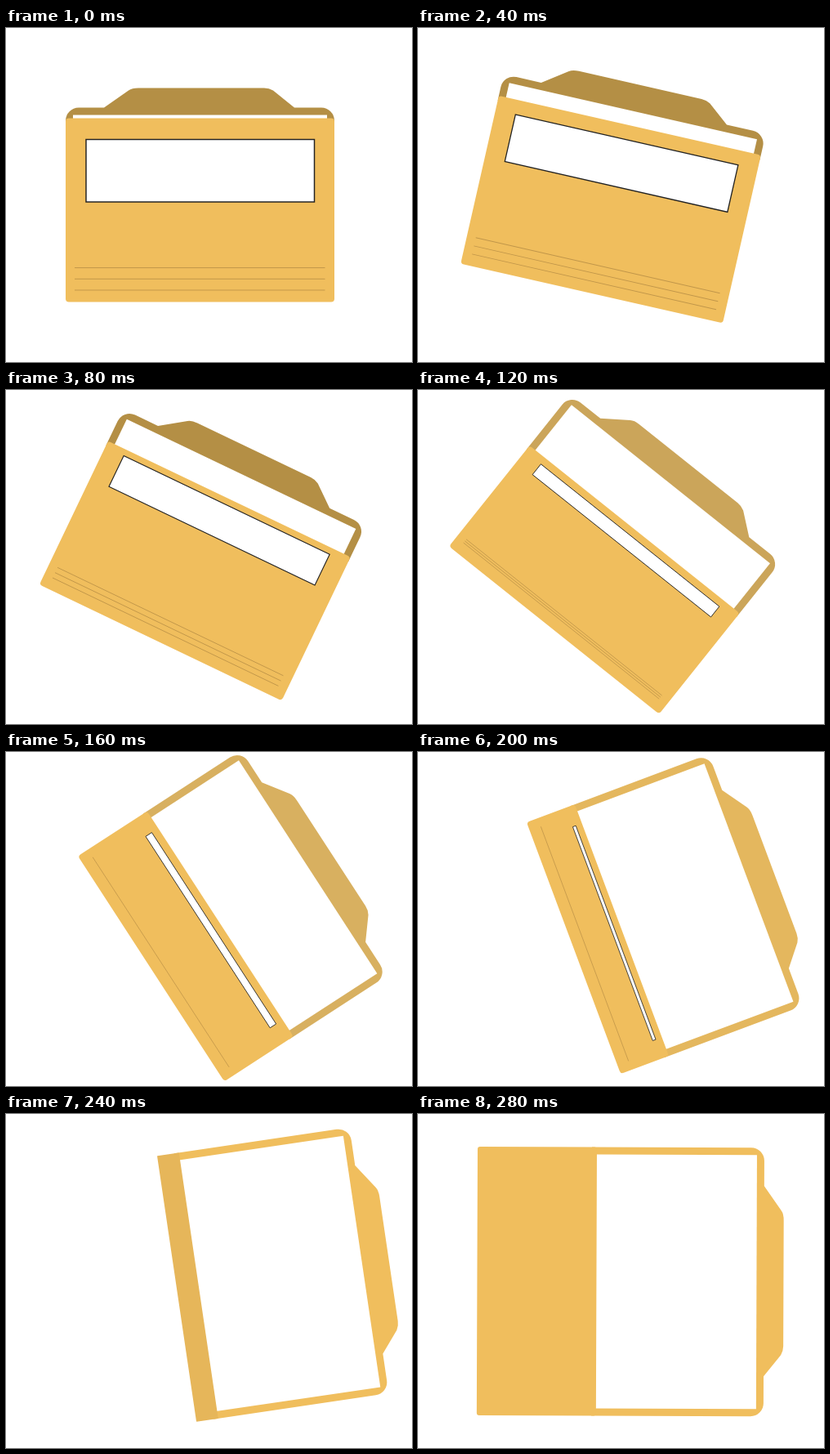
These frames come from a looping animation (497x409 px, 0.32 s). An HTML page:

```html
<!DOCTYPE html>
<html lang="en">
<head>
<meta charset="utf-8">
<title>Opening folder</title>
<style>
  html, body { margin: 0; width: 100%; height: 100%; overflow: hidden; background: #fff; }
  svg { display: block; width: 497px; height: 409px; }
  #paper, #label { fill: #fff; }
  #label { stroke: #222; }
  #lines { fill: none; stroke: #c2974a; }
</style>
</head>
<body>
<svg viewBox="0 0 497 409">
  <!-- Local origin: left end of the hinge; the folder extends upwards. -->
  <g id="folder">
    <path id="back"/>
    <rect id="paper" x="9" y="-229" width="311"/>
    <rect id="flap" width="329"/>
    <rect id="label" x="25" width="279.5"/>
    <path id="lines"/>
  </g>
</svg>
<script>
  const STEP = 40;
  const GOLD = '#f0be5d', BROWN = '#b48f45';

  // flap and label: [lower, upper] distance from the hinge; gap: line spacing
  const poses = [
    { at: [73, 335.5, 0], flap: [0, 225], label: [122.5, 199], gap: 13.7, back: BROWN },
    { at: [52.2, 288.6, 12.8], flap: [0, 211], label: [134, 193], gap: 10.3, back: BROWN },
    { at: [40.8, 238.3, 25.6], flap: [0, 195], label: [145, 187], gap: 7, back: BROWN },
    { at: [38, 191.5, 38.6], flap: [0, 158], label: [132.4, 148.9], gap: 2.7, back: '#cba55a' },
    { at: [88, 127.5, 57], flap: [0, 101], label: [82.7, 91.6], gap: 0, back: '#d8b060' },
    { at: [132.9, 86.1, 69.5], flap: [0, 63], label: [51, 55], gap: 0, back: '#e4b75e' },
    { at: [185, 51.3, 81.6], flap: [0, 27], back: GOLD, front: '#e6b65a', round: 0.5 },
    { at: [186, 40.4, 90.2], flap: [-113, 33], back: GOLD, round: 3 }
  ];

  const part = id => document.getElementById(id);
  const set = (id, attrs) => {
    for (const key in attrs) part(id).setAttribute(key, attrs[key]);
  };

  const backPath = base => `M0 ${-base} V-222 A16 16 0 0 1 16 -238 H47 L77 -259
    Q81 -262 89 -262 H243 Q249 -262 254 -259 L280 -238 H313
    A16 16 0 0 1 329 -222 V${-base} Z`;

  function draw({ at: [x, y, angle], flap: [low, high], label, gap, back, front = GOLD, round = 4 }) {
    set('folder', { transform: `translate(${x} ${y}) rotate(${angle})` });
    set('back', { d: backPath(high - 6), fill: back });
    set('paper', { height: 232 - high });
    set('flap', { y: -high, height: high - low, rx: round, fill: front });

    const display = label ? 'inline' : 'none';
    set('label', { display });
    set('lines', { display });
    if (!label) return;
    const tall = label[1] - label[0];
    set('label', { y: -label[1], height: tall, 'stroke-width': 0.7 + tall / 100 });
    const rows = gap ? [0, 1, 2] : [0];
    set('lines', {
      d: rows.map(i => `M11 ${-14.5 - i * gap} H317.5`).join(' '),
      'stroke-width': 0.75 + gap / 55
    });
  }

  let start, shown;
  function tick(now) {
    start ??= now;
    const index = Math.floor((now - start) / STEP) % poses.length;
    if (index !== shown) draw(poses[shown = index]);
    requestAnimationFrame(tick);
  }
  draw(poses[0]);
  requestAnimationFrame(tick);
</script>
</body>
</html>
```
